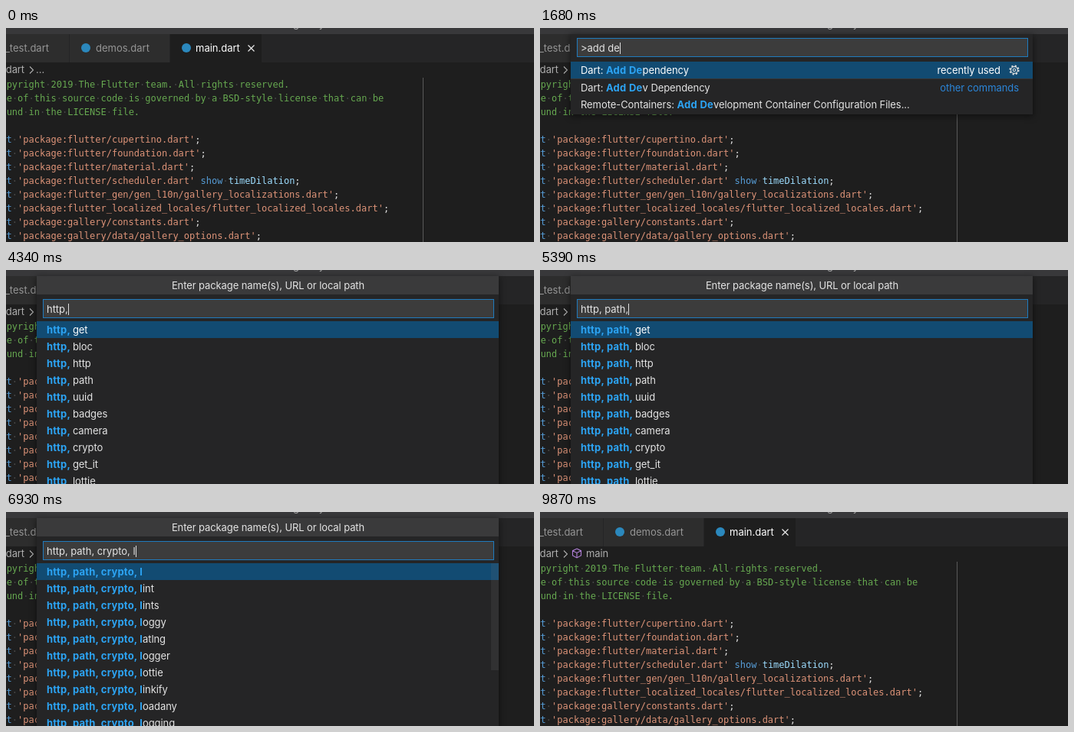
An HTML page for the animation above (9.94 s loop, 688 px wide and 280 px high).

```html
<!DOCTYPE html>
<html lang="en">
<head>
<meta charset="utf-8">
<title>Adding packages from the command palette</title>
<style>
  html, body { margin: 0; width: 100%; height: 100%; overflow: hidden; background: #1e1e1e; }
  #stage {
    position: relative; width: 688px; height: 280px; overflow: hidden; background: #1e1e1e;
    font: 13px/22px Inter, "Open Sans", sans-serif; letter-spacing: -.1px; color: #e4e4e4; white-space: pre;
  }
  #stage div, #stage svg { position: absolute; }
  #title { left: 0; top: 0; width: 688px; height: 8px; background: #38383a; overflow: hidden; color: #aaa; }
  #tabs { left: 0; top: 8px; width: 688px; height: 37px; background: #252526; line-height: 37px; letter-spacing: 0; }
  .tab { top: 0; height: 37px; background: #2d2d2d; color: #959595; }
  .tab.on { background: #1e1e1e; color: #fff; }
  .tab div { top: 0; }
  .tab .dot { top: 12px; width: 12px; height: 12px; border-radius: 50%; background: #2b88bd; }
  .crumb { top: 43px; color: #adadad; }
  svg { fill: none; stroke-width: 1.1; }
  #ruler { left: 543px; top: 65px; width: 1px; height: 215px; background: #5a5a5a; }
  #code { left: -35.5px; top: 65px; font: 12px/18px "DejaVu Sans Mono", monospace; letter-spacing: 0; color: #e0e0e0; }
  #code i { font-style: normal; color: #484848; }
  .comment { color: #66a850; }
  .key { color: #569cd6; }
  .str { color: #dd9378; }
  .name { color: #9cdcfe; }
  #palette { left: 40px; top: 8px; width: 602px; background: #252526; box-shadow: 0 2px 8px 1px rgba(0, 0, 0, .45); }
  #head { left: 0; top: 0; width: 602px; height: 24px; line-height: 25px; text-align: center; text-indent: 1px; background: #3a3a3b; }
  #field {
    left: 8px; width: 588px; height: 25px; box-sizing: border-box; padding-left: 4px;
    line-height: 24px; letter-spacing: -.05px; border: 1px solid #1f7bbd; background: #3c3c3c;
  }
  #field i { display: inline-block; width: 1px; height: 15px; margin-right: -1px; vertical-align: -3px; background: #ddd; }
  #field span { color: #999; }
  #list { left: 0; width: 602px; letter-spacing: -.07px; }
  .row { left: 0; width: 602px; height: 22px; text-indent: 13px; }
  .row.on { background: #124b72; color: #fff; }
  .row.line { border-top: 1px solid #363638; }
  .row b { color: #2ca4f4; font-weight: 700; letter-spacing: .2px; }
  .row small { font-size: 12px; letter-spacing: -.05px; margin-left: 4px; opacity: .65; }
  .row .tag { top: 0; right: 18px; text-indent: 0; color: #2b86d9; }
  .row.on .tag { right: 42px; color: #fff; }
  .row svg { left: 571px; top: 4px; stroke: #ddd; }
  #bar { right: 0; top: 67px; width: 10px; height: 140px; background: rgba(121, 121, 121, .45); }
  #bar { top: 59px; }
</style>
</head>
<body>
<div id="stage">
  <div id="title"><div style="left:374px;top:-17px">gallery</div></div>
  <div id="tabs">
    <div class="tab" style="left:0;width:82px"><div style="right:26px">_test.dart</div></div>
    <div class="tab" style="left:83px;width:130px"><div class="dot" style="left:15px"></div><div style="left:34px">demos.dart</div></div>
    <div class="tab on" style="left:214px;width:119px">
      <div class="dot" style="left:15px"></div><div style="left:33px">main.dart</div>
      <svg style="left:101px;top:14px" width="9" height="9" stroke="#eee"><path d="M.5 .5l8 8m0-8l-8 8"/></svg>
    </div>
  </div>
  <div class="crumb" style="right:664px">main.dart</div>
  <svg style="left:30px;top:50px" width="7" height="10" stroke="#adadad"><path d="M1 .5l4.5 4.5l-4.5 4.5"/></svg>
  <div class="crumb" id="dots" style="left:39px">…</div>
  <div class="crumb" id="symbol" style="left:60px">main
    <svg style="left:-19px;top:4px" width="14" height="14" stroke="#b180d7"><path d="M7 1l5.5 2.7v6.2l-5.5 3l-5.5-3v-6.2zM1.5 3.7l5.5 2.8l5.5-2.8M7 6.5v6.4"/></svg>
  </div>
  <div id="code"></div>
  <div id="ruler"></div>
  <div id="palette">
    <div id="head">Enter package name(s), URL or local path</div>
    <div id="field"></div>
    <div id="list"></div>
    <div id="bar"></div>
  </div>
</div>
<script>
const LOOP = 9940, SYMBOL = 490, OPEN = 910, PICK = 2730, CLOSE = 8050, BLINK = 490, FADE = 220;
const $ = id => document.getElementById(id);
const show = (id, on) => { $(id).style.display = on ? '' : 'none'; };
const span = (cls, text) => `<span class="${cls}">${text}</span>`;
const words = text => text.trim().split(/\s+/);

// Editor text
const spaced = text => text.replace(/ /g, '<i>·</i>');
const comments = [
  '// Copyright 2019 The Flutter team. All rights reserved.',
  '// Use of this source code is governed by a BSD-style license that can be',
  '// found in the LICENSE file.'
];
const imports = words(`flutter/cupertino flutter/foundation flutter/material flutter/scheduler
  flutter_gen/gen_l10n/gallery_localizations flutter_localized_locales/flutter_localized_locales
  gallery/constants gallery/data/gallery_options`);
const importLine = path => span('key', 'import') + '<i>·</i>' + span('str', `'package:${path}.dart'`) +
  (path.endsWith('scheduler') ? ` ${span('key', 'show')}<i>·</i>${span('name', 'timeDilation')}` : '') + ';';
$('code').innerHTML = [...comments.map(c => span('comment', spaced(c))), '', ...imports.map(importLine)].join('\n');

// Typing: every character appears at its own time
const type = (text, times) => times.map((t, i) => [t, text.slice(0, i + 1)]);
const keys = [
  [OPEN, ''],
  ...type('add dep', [1120, 1260, 1330, 1470, 1540, 1610, 1820]),
  [PICK, ''],
  ...type('http, path, crypto, logging', [
    3430, 3570, 3710, 3850, 4270, 4410,
    4830, 4900, 4970, 5040, 5390, 5530,
    5810, 5880, 5950, 6020, 6090, 6230, 6580, 6720,
    6860, 7000, 7140, 7210, 7350, 7420, 7560])
];

const commands = [
  'Dart: Add Dependency', 'Dart: Add Dev Dependency',
  'Remote-Containers: Add Development Container Configuration Files...',
  'Add Cursor Above', 'Add Cursor Below', 'Add Cursors to Line Ends', 'Add Line Comment',
  'Debug: Add Configuration...', 'Calls: Show Call Hierarchy', 'Change End of Line Sequence', 'Clear Command History'
];
const popular = words(`url_launcher http provider image_picker get cached_network_image path_provider
  flutter_local_notifications shared_preferences`);
const short = words('get bloc http path uuid badges camera crypto get_it lottie sqflite');
const others = words(`hive html hooks http_client http_parser http_retry http_server hydrated_bloc
  pub pedantic photo_view path_drawing path_parsing path_provider provider
  csv chewie characters crypto_keys cryptography
  lint lints loggy latlng logger linkify loadany logging`);
const logging = words('config manager service appenders bugfender to_logcat manager_flutter').map(s => 'logging_' + s);
const packages = [...others, ...short, ...logging].sort((a, b) => a.length - b.length);

const bold = text => text && `<b>${text}</b>`;

function commandRows(query) {
  const re = new RegExp('(' + words(query).join(')(.*? )(') + ')', 'i');
  const mark = (_, a, gap, b) => typeof b === 'string' ? bold(a) + gap + bold(b) : bold(a);
  const found = commands.filter(c => re.test(c));
  return found.map(c => query ? c.replace(re, mark) : c);
}

function packageRows(text) {
  if (!text) return [
    'Local Path Package <small>add a package from a local path</small>',
    'Git Repository URL <small>add a package from a Git repository</small>', ...popular];
  const cut = text.lastIndexOf(',') + 1;
  const part = text.slice(cut).trim();
  const start = cut ? text.slice(0, cut) + ' ' : '';
  if (!part) return short.map(p => bold(start) + p);
  const found = packages.filter(p => p.startsWith(part));
  if (found[0] !== part) found.unshift(part);
  return found.map(p => bold(start + part) + p.slice(part.length));
}

const gear = `<svg width="14" height="14"><circle cx="7" cy="7" r="5.6" stroke-width="2" stroke-dasharray="2.2 2.2"/>
<circle cx="7" cy="7" r="4.4"/><circle cx="7" cy="7" r="1.7"/></svg>`;
const tag = text => `<div class="tag">${text}</div>`;
const commandTags = [tag('recently used') + gear, tag('other commands')];

function drawPalette(text, picking, caret) {
  const rows = picking ? packageRows(text) : commandRows(text);
  const top = picking ? 59 : 36;
  show('head', picking);
  show('bar', picking && rows.length > 10 && !/, ?$/.test(text));
  $('field').style.top = (picking ? 30 : 5) + 'px';
  $('field').innerHTML = (picking ? '' : '&gt;') + text + (caret ? '<i></i>' : '') +
    (picking && !text ? '<span>package name (can be comma separated), URL or path</span>' : '');
  $('list').style.top = top + 'px';
  $('list').innerHTML = rows.map((row, i) => {
    const cls = i === 0 ? 'row on' : i === 1 && !picking ? 'row line' : 'row';
    const y = i * 22 + (i > 1 && !picking ? 1 : 0);
    return `<div class="${cls}" style="top:${y}px">${row}${!picking && commandTags[i] || ''}</div>`;
  }).join('');
  $('palette').style.height = top + rows.length * 22 + 3 + 'px';
}

let last;
function frame(now) {
  const t = now % LOOP;
  const open = t >= OPEN && t < CLOSE;
  show('dots', t < SYMBOL);
  show('symbol', t >= SYMBOL);
  show('palette', open);
  if (open) {
    const [since, text] = keys.filter(k => k[0] <= t).pop();
    const age = t - since;
    const picking = t >= PICK;
    const caret = Math.floor(age / BLINK) % 2 === 0;
    const state = [text, picking, caret].join('|');
    if (state !== last) drawPalette(text, picking, caret);
    last = state;
    $('bar').style.opacity = Math.min(1, age / FADE);
  }
  requestAnimationFrame(frame);
}
frame(0);
</script>
</body>
</html>
```
